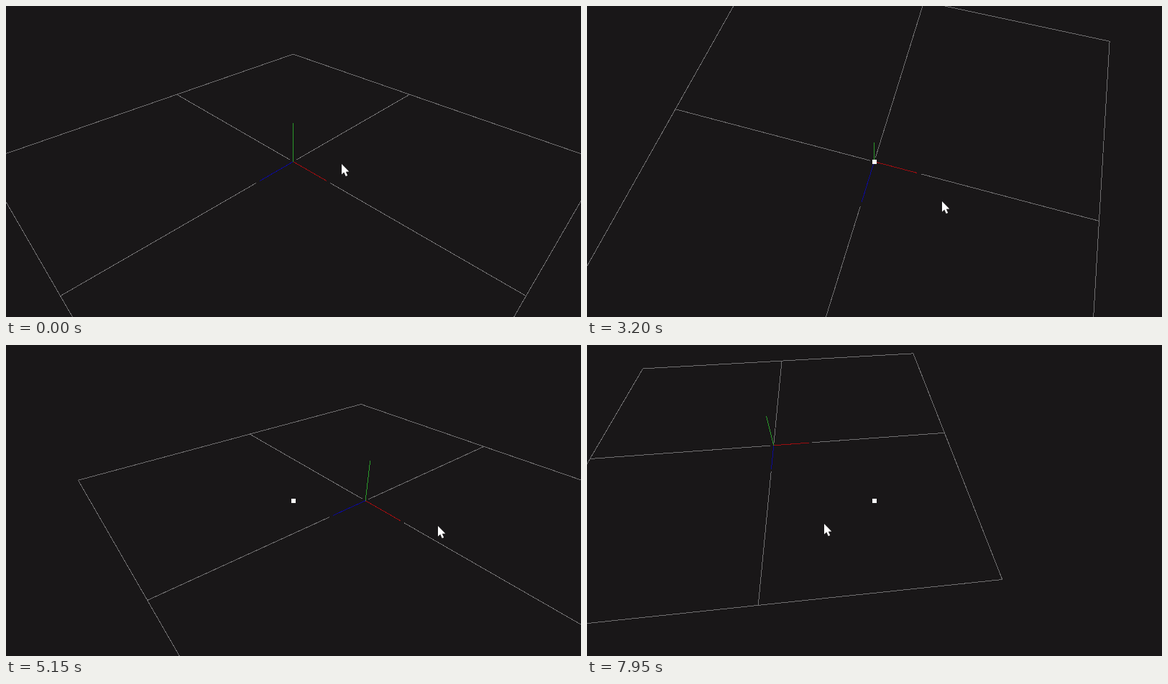
Write an HTML page that moves like this. It is 800 px wide and 433 px high and loops after 8 s.

```html
<!DOCTYPE html>
<html lang="en">
<head>
<meta charset="utf-8">
<title>Orbit and pan</title>
<style>
  html, body { margin: 0; width: 100%; height: 100%; overflow: hidden; background: #191718; }
  svg { display: block; width: 100%; height: 100%; }
  path { fill: none; stroke-width: 1; shape-rendering: crispEdges; }
</style>
</head>
<body>
<svg viewBox="0 0 800 433">
  <path id="grid" stroke="#706f70"/>
  <path id="axisX" stroke="#9c0d10"/>
  <path id="axisY" stroke="#2a982a"/>
  <path id="axisZ" stroke="#0c0a96"/>
  <rect id="pivot" x="397" y="214" width="6" height="6" fill="#fff"/>
  <polygon id="cursor" fill="#fff" points="0,0 0,14.5 3.3,11.6 5.7,17 8.2,16 5.8,10.7 10.3,10.4"/>
</svg>
<script>
const LOOP = 8000, STEP = 50;
const FOCAL = 529, DIST = 1.732, CX = 399.6, CY = 216.7, NEAR = 0.02;
const AXIS = 0.2, GAP = 0.02;
const HOME = { azimuth: 45, elevation: 35.26 };
const TURN = 0.437, LIFT = 0.27; // degrees per pixel dragged
const el = id => document.getElementById(id);

// The hand: time, x, y and what the mouse does from there on.
// The camera follows from these drags alone.
const hand = [
  [0, 467, 220, "move"],
  [150, 465.3, 196, "orbit"],
  [875, 230, 220, "orbit"],
  [1550, 316, 221, "move"],
  [1750, 278.3, 178.6, "orbit"],
  [2750, 535, 264, "orbit"],
  [3200, 494, 272, "orbit"],
  [3900, 357, 255, "orbit"],
  [4250, 409.7, 141.3, "move"],
  [4850, 500.5, 252, "pan"],
  [5150, 601, 252, "pan"],
  [5450, 723, 266.5, "move"],
  [5950, 553, 245, "move"],
  [6050, 553, 245, "orbit"],
  [7000, 689.2, 302.4, "move"],
  [7200, 625.4, 215.7, "pan"],
  [7950, 330, 249, "pan"]
];

// Slope at a key: flat at the ends and where the hand turns round
function tangent(k, c) {
  if (k === 0 || k === hand.length - 1) return 0;
  const slope = i => (hand[i + 1][c] - hand[i][c]) / (hand[i + 1][0] - hand[i][0]);
  const a = slope(k - 1), b = slope(k);
  return a * b <= 0 ? 0 : 2 * a * b / (a + b);
}

// Hand position on the stroke from key i to the next one
function along(i, t) {
  const p = hand[i], q = hand[i + 1], h = q[0] - p[0];
  const u = Math.min(1, (t - p[0]) / h);
  return [1, 2].map(c => p[c] + (q[c] - p[c]) * u * u * (3 - 2 * u)
    + h * u * (1 - u) * ((1 - u) * tangent(i, c) - u * tangent(i + 1, c)));
}

// Camera axes for an azimuth and elevation in degrees
function basis(azimuth, elevation) {
  const a = azimuth * Math.PI / 180, e = elevation * Math.PI / 180;
  const ca = Math.cos(a), sa = Math.sin(a), ce = Math.cos(e), se = Math.sin(e);
  return {
    right: [sa, 0, -ca],
    up: [-ca * se, ce, -sa * se],
    back: [ca * ce, se, sa * ce]
  };
}

// Replays the strokes up to time t
function stateAt(t) {
  let { azimuth, elevation } = HOME;
  let shift = [0, 0, 0], cursor, mode;
  for (let i = 0; i < hand.length - 1 && hand[i][0] <= t; i++) {
    cursor = along(i, t);
    mode = hand[i][3];
    const dx = cursor[0] - hand[i][1], dy = cursor[1] - hand[i][2];
    if (mode === "orbit") {
      azimuth += TURN * dx;
      elevation += LIFT * dy;
    } else if (mode === "pan") {
      const { right, up } = basis(azimuth, elevation);
      shift = shift.map((v, n) => v + (right[n] * dx - up[n] * dy) * DIST / FOCAL);
    }
  }
  return { view: basis(azimuth, elevation), shift, cursor, dragging: mode !== "move" };
}

const dot = (p, q) => p[0] * q[0] + p[1] * q[1] + p[2] * q[2];

function segment(view, shift, from, to) {
  const toCamera = p => {
    const q = p.map((v, i) => v + shift[i]);
    return [dot(q, view.right), -dot(q, view.up), DIST - dot(q, view.back)];
  };
  const clip = (p, q) => {
    if (p[2] >= NEAR) return p;
    const k = (NEAR - p[2]) / (q[2] - p[2]);
    return p.map((v, i) => v + (q[i] - v) * k);
  };
  const place = p => (CX + FOCAL * p[0] / p[2]).toFixed(2) + " " + (CY + FOCAL * p[1] / p[2]).toFixed(2);
  const a = toCamera(from), b = toCamera(to);
  if (a[2] < NEAR && b[2] < NEAR) return "";
  return "M" + place(clip(a, b)) + "L" + place(clip(b, a));
}

function draw(t) {
  const { view, shift, cursor, dragging } = stateAt(t);
  const line = (p, q) => segment(view, shift, p, q);

  let grid = "";
  for (const s of [-1, 1]) {
    grid += line([s, 0, -1], [s, 0, 1]) + line([-1, 0, s], [1, 0, s]);
  }
  // The middle lines leave room for the coloured axes
  for (const [p, q] of [[-1, -GAP], [AXIS + GAP, 1]]) {
    grid += line([p, 0, 0], [q, 0, 0]) + line([0, 0, p], [0, 0, q]);
  }
  el("grid").setAttribute("d", grid);
  ["axisX", "axisY", "axisZ"].forEach((id, n) => {
    el(id).setAttribute("d", line([0, 0, 0], [0, 1, 2].map(i => i === n ? AXIS : 0)));
  });

  el("pivot").setAttribute("visibility", dragging ? "visible" : "hidden");
  el("cursor").setAttribute("transform", "translate(" + cursor.map(v => v.toFixed(1)) + ")");
}

function tick() {
  draw(Math.floor(performance.now() % LOOP / STEP) * STEP);
  requestAnimationFrame(tick);
}
tick();
</script>
</body>
</html>
```
